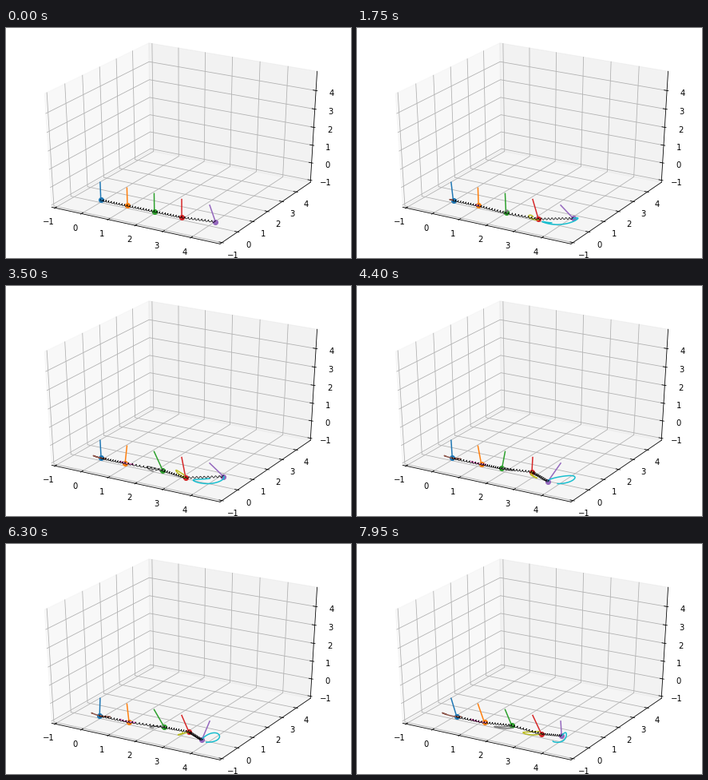
Write a matplotlib script that moves like this. It is 432 px wide and 288 px high and loops after 8000 ms.

```python
import numpy as np
import matplotlib.pyplot as plt
from matplotlib.animation import FuncAnimation

plt.rcParams["font.family"] = "DejaVu Sans"

FRAMES, STEP = 160, 50
LOW, SPAN = -1.0, 5.9          # the same limits on all three axes
EDGE = 0.5 + 1 / 48            # half size of the padded box
TAIL = 30                      # frames kept in each trail
COUNT = 5
PIVOT_Y = 0.04
ELEV, AZIM, DIST = np.radians(30), np.radians(-60), 10

RIGHT = np.array([-np.sin(AZIM), np.cos(AZIM), 0])
AHEAD = np.array([np.cos(ELEV) * np.cos(AZIM),
                  np.cos(ELEV) * np.sin(AZIM), np.sin(ELEV)])
UP = np.cross(AHEAD, RIGHT)


def project(box):
    """Perspective view of points given in box units (-0.5 to 0.5)."""
    box = np.asarray(box, float)
    depth = DIST - box @ AHEAD
    return box @ RIGHT / depth, box @ UP / depth


def unit(value):
    return (np.asarray(value, float) - LOW) / SPAN - 0.5


# Beating swing of each bob: amplitude, time of a peak, beat rate, beat crest
RATE_X, RATE_Y = 3.4, 3.14
SWING_X = [(.36, 5.8, 0, 0), (.29, 5.9, 0, 0), (.33, 6.23, .9, 6.6),
           (.32, 1.58, .52, 2.3), (.42, 1.47, .17, 0)]
SWING_Y = [(0, 0, 0, 0), (0, 0, 0, 0), (.22, 8, .4, 8),
           (.2, 6.4, 0, 0), (.43, 1.63, 0, 0)]


def swing(t, rate, amp, peak, beat, crest):
    return amp * np.cos(rate * (t - peak)) * np.cos(beat * (t - crest))


def bob_path(i):
    t = np.arange(FRAMES) * STEP / 1000
    # the push starts at the last bob and reaches the others later
    delay = 0.6 * (COUNT - 1 - i)
    reach = 1 - np.exp(-(t / delay) ** 2) if delay else 1
    x = reach * swing(t, RATE_X, *SWING_X[i])
    y = reach * swing(t, RATE_Y, *SWING_Y[i])
    return np.column_stack([x + i, y + PIVOT_Y, -np.sqrt(1 - x ** 2 - y ** 2)])


def coil(start, end, turns=10, radius=0.045):
    """Helix from one bob to the next."""
    s = np.linspace(0, 1, turns * 12 + 1)[:, None]
    along = end - start
    side = np.cross(along, [0, 0, 1])
    side /= np.linalg.norm(side)
    top = np.cross(side, along)
    top /= np.linalg.norm(top)
    turn = 2 * np.pi * turns * s
    return start + along * s + radius * (side * np.sin(turn) + top * np.cos(turn))


fig = plt.figure(figsize=(6, 4), dpi=72, facecolor="white")
ax = fig.add_axes([0, 0, 1, 1])
ax.set_xlim(-0.095, 0.09)
ax.set_ylim(-0.095, 0.09)
ax.axis("off")


def stroke(points, color, width=0.8, order=1.0):
    ax.plot(*project(points), color=color, lw=width, zorder=order)


def draw_box():
    e = EDGE
    panes = [
        ([(-e, -e, -e), (-e, e, -e), (-e, e, e), (-e, -e, e)], 0.95),
        ([(-e, e, -e), (e, e, -e), (e, e, e), (-e, e, e)], 0.90),
        ([(-e, -e, -e), (e, -e, -e), (e, e, -e), (-e, e, -e)], 0.925),
    ]
    for corners, grey in panes:
        ax.fill(*project(corners), color=(grey,) * 3, alpha=0.5, lw=1, zorder=0.5)

    # corner of the axis line, corners of the grid line, tick direction
    sides = [
        ([0, -e, -e], [(0, e, -e), (0, e, e)], 1),
        ([e, 0, -e], [(-e, 0, -e), (-e, 0, e)], 0),
        ([e, e, 0], [(-e, e, 0), (-e, -e, 0)], 0),
    ]
    label_gap = 11.5 * 48 / 720 / 12
    for axis, (base, bends, across) in enumerate(sides):
        ends = np.array([base, base], float)
        ends[:, axis] = -e, e
        stroke(ends, "black", order=1.4)
        for value in range(-1, 5):
            grid = np.array([base] + bends, float)
            grid[:, axis] = unit(value)
            stroke(grid, "#b0b0b0", order=1.2)

            tick = np.array([grid[0], grid[0]])
            tick[:, across] += np.sign(base[across]) * np.array([0.1, -0.2]) / 12
            stroke(tick, "black", order=1.5)

            spot = grid[0] + np.sign(base) * label_gap
            ax.text(*project(spot), str(value).replace("-", "\u2212"),
                    size=10, ha="center", va="top")


draw_box()
paths = [bob_path(i) for i in range(COUNT)]
pivots = [np.array([i, PIVOT_Y, 0.0]) for i in range(COUNT)]

rods = [ax.plot([], [], color=f"C{i}", lw=1.5, marker="o", ms=6,
                markevery=[1], zorder=2)[0] for i in range(COUNT)]
trails = [ax.plot([], [], color=f"C{i + COUNT}", lw=1.5, zorder=3)[0]
          for i in range(COUNT)]
springs = [ax.plot([], [], color="black", lw=0.7, zorder=4)[0]
           for _ in range(COUNT - 1)]


def place(line, points):
    line.set_data(*project(unit(points)))


def update(frame):
    for i, path in enumerate(paths):
        place(rods[i], [pivots[i], path[frame]])
        place(trails[i], path[max(0, frame - TAIL):frame + 1])
    for i, spring in enumerate(springs):
        place(spring, coil(paths[i][frame], paths[i + 1][frame]))
    return rods + trails + springs


update(0)
anim = FuncAnimation(fig, update, frames=FRAMES, interval=STEP,
                     init_func=lambda: update(0), repeat=True,
                     repeat_delay=0, blit=False)
plt.show()
```
